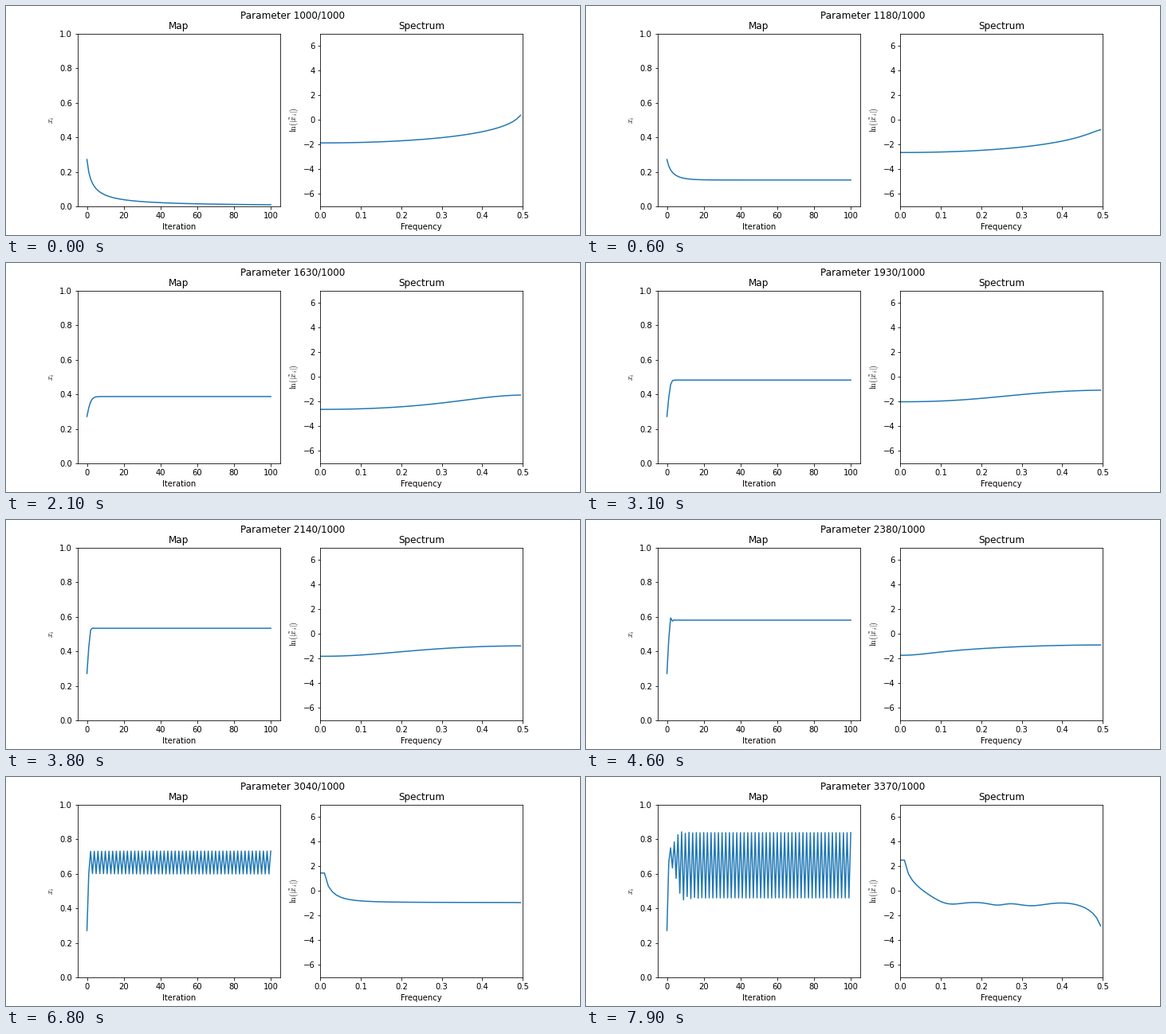
Animation of 720x288 px, one loop 8 s. Source, as a matplotlib script:

```python
import numpy as np
import matplotlib.pyplot as plt
from matplotlib.animation import FuncAnimation

plt.rcParams["mathtext.fontset"] = "cm"

FRAMES = 80
STEPS = 101
START = 0.2712


def orbit(r):
    """Logistic map x -> r x (1 - x)."""
    x = np.empty(STEPS)
    x[0] = START
    for k in range(1, STEPS):
        x[k] = r * x[k - 1] * (1 - x[k - 1])
    return x


def spectrum(x):
    """Log magnitudes from the highest frequency down to the lowest non-zero one."""
    return np.log(np.abs(np.fft.ifftshift(np.fft.fft(x))))[:STEPS // 2 + 1]


fig, (ax_map, ax_spec) = plt.subplots(1, 2, figsize=(10, 4), dpi=72, facecolor="white")
fig.subplots_adjust(left=0.125, right=0.9, bottom=0.125, top=0.88, wspace=0.2)
heading = fig.suptitle("", fontsize=12)

map_line, = ax_map.plot(np.arange(STEPS), np.zeros(STEPS), lw=1.5)
ax_map.set(title="Map", xlabel="Iteration", ylabel="$x_i$",
           xlim=(-5, 105), ylim=(0, 1))

freqs = np.arange(STEPS // 2 + 1) / STEPS
spec_line, = ax_spec.plot(freqs, np.zeros_like(freqs), lw=1.5)
ax_spec.set(title="Spectrum", xlabel="Frequency", ylabel=r"$\ln(|\tilde{x}_i|)$",
            xlim=(0, 0.5), ylim=(-7, 7), yticks=range(-6, 7, 2))


def update(frame):
    param = 1000 + 30 * frame
    x = orbit(param / 1000)
    map_line.set_ydata(x)
    spec_line.set_ydata(spectrum(x))
    heading.set_text(f"Parameter {param}/1000")
    return map_line, spec_line, heading


anim = FuncAnimation(fig, update, frames=FRAMES, interval=100, repeat=True, repeat_delay=0)
plt.show()
```
